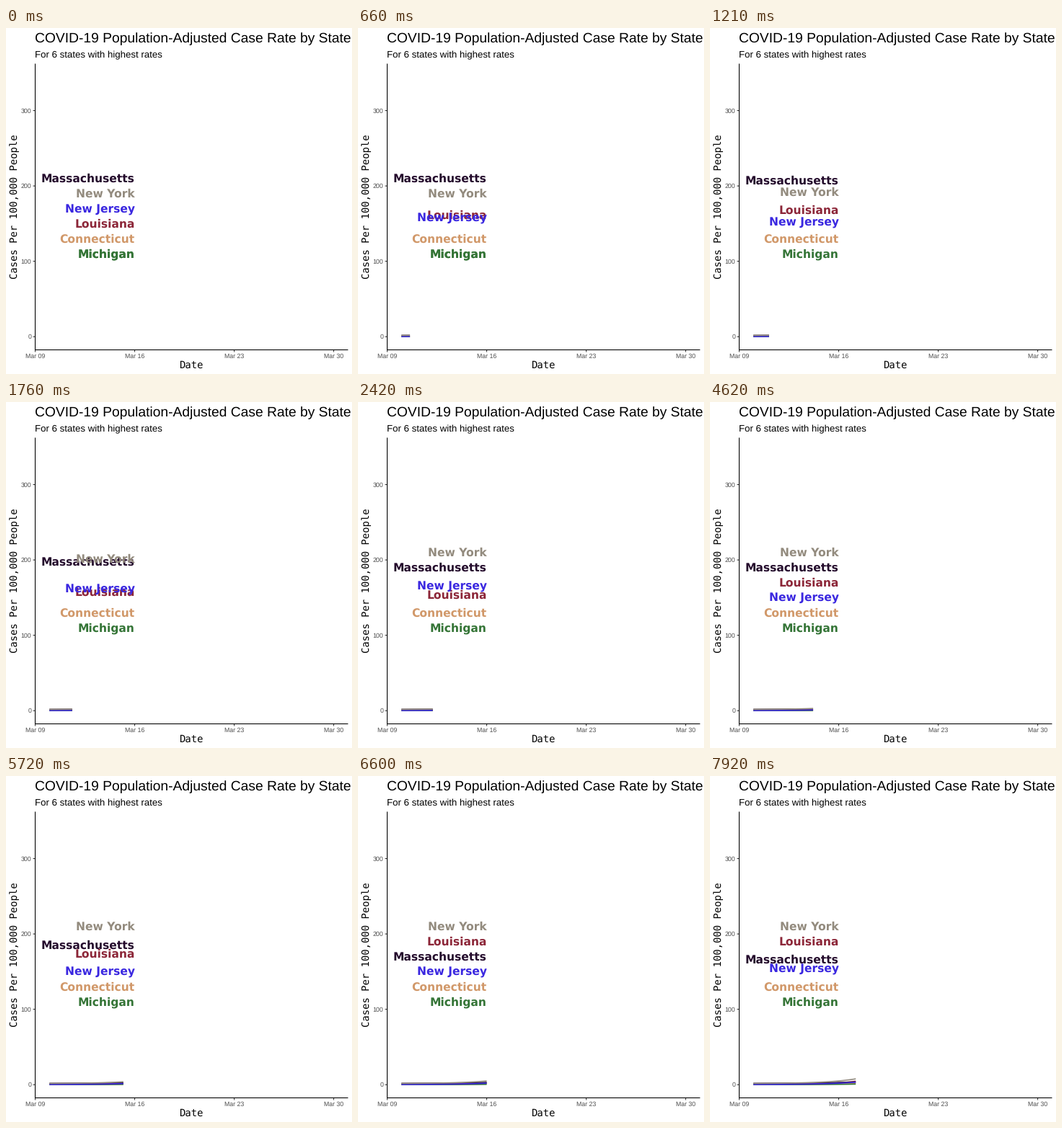
Animation of 480x480 px, one loop 8000 ms. Source, as a matplotlib script:

```python
import numpy as np
import matplotlib.pyplot as plt
from matplotlib.animation import FuncAnimation

SIZE, DPI = 480, 100
LOOP, INTERVAL, STEP = 8000, 50, 110  # ms; the picture advances every STEP
STEPS_PER_DAY = 10
PX = 72 / DPI  # points per pixel

plt.rcParams["text.hinting"] = "none"

# Colour, then base, scale and growth of base + scale * exp(growth * day).
# Listed in drawing order, later ones on top.
STATES = {
    "Connecticut": ("#d19869", 0, .07, .46),
    "Louisiana": ("#8c2638", 0, .1, .53),
    "Massachusetts": ("#240b2c", 1.4, .3, .27),
    "Michigan": ("#357537", 0, .03, .45),
    "New Jersey": ("#3a27e0", 0, .15, .43),
    "New York": ("#938b7e", 1.5, .17, .5),
}
FIRST_ORDER = ["Massachusetts", "New York", "New Jersey",
               "Louisiana", "Connecticut", "Michigan"]
# Which states climb one place on arriving at a day.
CLIMBS = {1: ["Louisiana"], 2: ["New York", "New Jersey"], 3: ["Louisiana"],
          6: ["Louisiana"], 8: ["New Jersey"]}


def daily_orders(days):
    orders = [list(FIRST_ORDER)]
    for day in range(1, days):
        order = list(orders[-1])
        for name in CLIMBS.get(day, []):
            i = order.index(name)
            order[i - 1], order[i] = order[i], order[i - 1]
        orders.append(order)
    return orders


ORDERS = daily_orders(9)


def rank(name, now):
    places = [order.index(name) for order in ORDERS]
    return np.interp(now, range(len(places)), places)


def x_px(day):
    """Pixel column of a number of days after Mar 09."""
    return 40.5 + 19.72 * day


def y_px(rate):
    return 428.2 - 1.0455 * rate


fig = plt.figure(figsize=(SIZE / DPI, SIZE / DPI), dpi=DPI, facecolor="white")
ax = fig.add_axes([0, 0, 1, 1])
ax.set(xlim=(0, SIZE), ylim=(SIZE, 0))
ax.axis("off")


def text(x, y, s, px, font="Liberation Sans", **kw):
    return ax.text(x, y, s, fontsize=px * PX, family=font, va="baseline", **kw)


def rule(xs, ys, color="black"):
    ax.plot(xs, ys, color=color, lw=1.07 * PX, solid_capstyle="butt", snap=False)


def label(name):
    return text(178.5, 0, name, 15.5, "DejaVu Sans", color=STATES[name][0],
                weight="bold", ha="right")


text(40, 20, "COVID-19 Population-Adjusted Case Rate by State", 19.3)
text(40, 41, "For 6 states with highest rates", 13.27)
text(256.8, 472, "Date", 13.9, "DejaVu Sans Mono", ha="center")
text(16, 247.5, "Cases Per 100,000 People", 13.9, "DejaVu Sans Mono",
     ha="center", rotation=90, rotation_mode="anchor")

for rate in range(0, 400, 100):
    y = y_px(rate)
    rule([37.5, 40.5], [y, y], "#333333")
    text(35.3, y + 3.2, str(rate), 8.8, color="#4d4d4d", ha="right")
for day in range(0, 22, 7):
    x = x_px(day)
    rule([x, x], [446.5, 449.5], "#333333")
    text(x, 458, f"Mar {9 + day:02d}", 8.8, color="#4d4d4d", ha="center")
rule([40.5, 40.5], [49.5, 447])
rule([40, 474.5], [446.5, 446.5])

lines = {name: ax.plot([], [], color=state[0], lw=1.7 * PX,
                       solid_capstyle="butt", snap=False)[0]
         for name, state in STATES.items()}
labels = {name: label(name) for name in STATES}
# A second copy makes Michigan heavier during the first day.
double = label("Michigan")
double.set_y(y_px(110) + 5.6)


def update(frame):
    step = (frame * INTERVAL + INTERVAL - 10) // STEP
    now = step / STEPS_PER_DAY
    days = np.linspace(0, now, step + 1)
    for name, (_, base, scale, growth) in STATES.items():
        lines[name].set_data(x_px(1 + days),
                             y_px(base + scale * np.exp(growth * days)))
        labels[name].set_y(y_px(210 - 20 * rank(name, now)) + 5.6)
    double.set_visible(now < 1)
    return [*lines.values(), *labels.values(), double]


anim = FuncAnimation(fig, update, frames=LOOP // INTERVAL, interval=INTERVAL,
                     repeat=True, repeat_delay=0)
plt.show()
```
